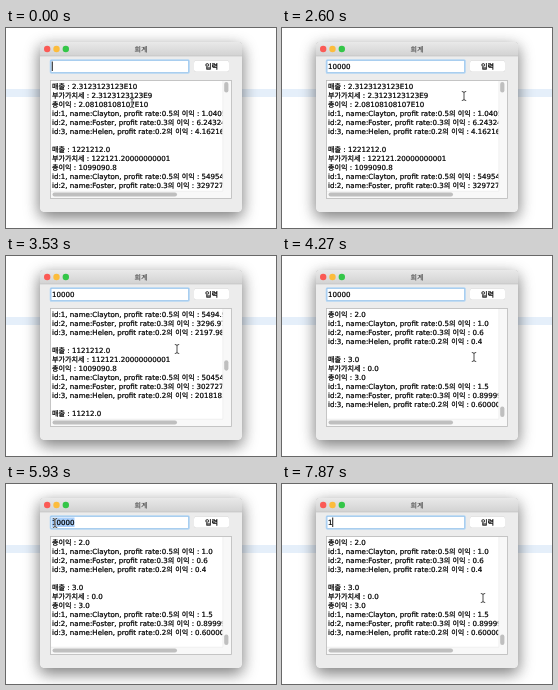
These frames come from a looping animation (270x200 px, 8 s). An HTML page:

```html
<!DOCTYPE html>
<html>
<head>
<meta charset="utf-8">
<style>
  html, body { margin: 0; width: 100%; height: 100%; overflow: hidden; background: #fff; }
  svg { display: block; }
  text {
    font: 7.08px "DejaVu Sans", "Noto Sans CJK KR", "Noto Sans CJK", sans-serif;
    fill: #000;
    stroke: #000;
    stroke-width: .22px;
    text-rendering: geometricPrecision;
  }
  .mid { text-anchor: middle; }
  .title { fill: #444; stroke: #444; stroke-width: .1px; }
  .window { filter: drop-shadow(0 5px 8px rgba(0, 0, 0, .42)) drop-shadow(0 0 .5px rgba(0, 0, 0, .4)); }
  .button { filter: drop-shadow(0 .4px .4px rgba(0, 0, 0, .3)); }
</style>
</head>
<body>
<svg width="270" height="200" viewBox="0 0 270 200">
  <defs>
    <linearGradient id="bar" x2="0" y2="1">
      <stop stop-color="#e9e9e9"/><stop offset="1" stop-color="#d2d2d2"/>
    </linearGradient>
    <clipPath id="view"><rect x="45" y="53" width="171.2" height="110"/></clipPath>
    <path id="beamShape" d="M-1.8-4.5Q0-4.5 0-3.4Q0-4.5 1.8-4.5M0-3.4V3.4M-1.8 4.5Q0 4.5 0 3.4Q0 4.5 1.8 4.5"/>
  </defs>
  <rect y="61" width="270" height="8" fill="#e5effa"/>

  <rect class="window" x="34" y="14" width="202" height="170" rx="3.5" fill="#ececec"/>
  <path d="M34 28V17.5a3.5 3.5 0 0 1 3.5-3.5h195a3.5 3.5 0 0 1 3.5 3.5V28z" fill="url(#bar)"/>
  <path d="M34 28h202" stroke="#bdbdbd" stroke-width=".6"/>
  <circle cx="41.2" cy="21" r="3.2" fill="#fb5a55"/>
  <circle cx="50.5" cy="21" r="3.2" fill="#fcbc3c"/>
  <circle cx="59.8" cy="21" r="3.2" fill="#34c648"/>
  <text class="mid title" x="135" y="23.5">회계</text>

  <rect x="44.5" y="32" width="138.5" height="13" rx="1" fill="#fff" stroke="#b4d6f4" stroke-width="1.6"/>
  <rect x="45" y="32.5" width="137.5" height="12" fill="none" stroke="#8dbdea" stroke-width=".5"/>
  <rect id="selection" y="33.5" height="9.5" fill="#a9cffb"/>
  <text id="field" x="46" y="41"></text>
  <rect id="caret" y="33.5" width=".9" height="9.5" fill="#000"/>

  <rect class="button" x="188" y="32.4" width="35" height="11.4" rx="2" fill="#fff"/>
  <text class="mid" x="205.5" y="40.8">입력</text>

  <rect x="44.5" y="52.5" width="181" height="118" fill="#fff" stroke="#b9b9b9" stroke-width=".8"/>
  <path d="M217 53h8v117h-180v-7h172z" fill="#f8f8f8"/>
  <path d="M216.8 53v110M45 163.2h172" stroke="#e4e4e4" stroke-width=".5"/>
  <rect x="46.5" y="164.5" width="124.5" height="4" rx="2" fill="#bfbfbf"/>
  <rect id="thumb" x="218.2" width="4.2" height="10.5" rx="2.1" fill="#bfbfbf"/>
  <g clip-path="url(#view)"><g id="log"></g></g>

  <g id="beam" fill="none" stroke-linecap="round">
    <use href="#beamShape" stroke="#fff" stroke-width="1.6" stroke-opacity=".7"/>
    <use href="#beamShape" stroke="#222" stroke-width=".8"/>
  </g>
  <path id="arrow" d="M0 0V7.6L1.8 6L3 8.9L4.3 8.3L3.1 5.5H5.5z" fill="#000" stroke="#fff" stroke-width=".6"/>
</svg>
<script>
// All times are in ticks of 1/15 s.
const FPS = 15, TICKS = 120, LINE = 9, LEFT = 46, CHAR = 4.5;
const $ = id => document.getElementById(id);

// Ledger: each sale gives revenue, tax, profit and the partners' shares.
const sales = [23123123123, 1221212, 112121, 1212, 12121, 112211, 1221, 12211,
               1121212, 11212, 1122, 112, 11, 1, 2, 3];
const partners = [['Clayton', 0.5], ['Foster', 0.3], ['Helen', 0.2]];

function decimal(n) {
  if (n >= 1e7) return n.toExponential().replace('e+', 'E');
  return Number.isInteger(n) ? n + '.0' : String(n);
}

function entry(sale) {
  const tax = sale < 10 ? 0 : sale * 0.1, profit = sale - tax;
  return [
    `매출 : ${decimal(sale)}`,
    `부가가치세 : ${decimal(tax)}`,
    `총이익 : ${decimal(profit)}`,
    ...partners.map(([name, rate], i) =>
      `id:${i + 1}, name:${name}, profit rate:${rate}의 이익 : ${decimal(profit * rate)}`),
    ''
  ];
}

const lines = sales.flatMap(entry);
const lastTop = lines.length - 12;
lines.forEach((line, i) => {
  const text = document.createElementNS('http://www.w3.org/2000/svg', 'text');
  text.setAttribute('x', LEFT);
  text.setAttribute('y', 60.5 + i * LINE);
  text.textContent = line;
  $('log').append(text);
});

const home = { x: 126, y: 75 };
const moves = [
  { from: 33, to: 39, x: 182, y: 68 },
  { from: 39, to: 41, x: 245, y: 64 },
  { from: 45, to: 51, x: 171, y: 93 },
  { from: 53, to: 61, x: 192, y: 101 },
  { from: 66, to: 70, x: 198, y: 126 },
  { from: 70, to: 79, x: 205, y: 42 },
  { from: 81, to: 88, x: 49, y: 39 },
  { from: 92, to: 99, x: 207, y: 132 },
  { from: 103, to: 108, x: 201, y: 114 }
];
const typeStart = 13, typeGap = 3.25, dragStart = 86, eraseAt = 93, retypeAt = 118;

function ease(tick, from, to) {
  const p = Math.min(1, Math.max(0, (tick - from) / (to - from)));
  return p * p * (3 - 2 * p);
}

function pointerAt(tick) {
  return moves.reduce((p, m) => {
    const k = ease(tick, m.from, m.to);
    return { x: p.x + (m.x - p.x) * k, y: p.y + (m.y - p.y) * k };
  }, home);
}

// Field content and the moment of the last key, which restarts the blinking.
function fieldAt(tick) {
  if (tick >= retypeAt) return { value: '1', edited: retypeAt };
  if (tick >= eraseAt) return { value: '', edited: eraseAt };
  const count = Math.min(5, Math.floor((tick - typeStart) / typeGap) + 1);
  if (count < 1) return { value: '', edited: -4 };
  return { value: '10000'.slice(0, count), edited: Math.floor(typeStart + typeGap * (count - 1)) };
}

const inside = (p, l, t, r, b) => p.x > l && p.x < r && p.y > t && p.y < b;
const show = (id, on) => $(id).setAttribute('visibility', on ? 'visible' : 'hidden');
const move = (id, x, y) => $(id).setAttribute('transform', `translate(${x} ${y})`);

function render(tick) {
  const pointer = pointerAt(tick);
  const overText = inside(pointer, 44, 32, 183, 45) || inside(pointer, 45, 53, 217, 163);
  show('beam', overText);
  show('arrow', !overText);
  move('beam', pointer.x, pointer.y);
  move('arrow', pointer.x, pointer.y);

  const top = Math.round(lastTop * ease(tick, 49, 56.8));
  move('log', 0, -top * LINE);
  $('thumb').setAttribute('y', 54 + 96.5 * top / lastTop);

  const { value, edited } = fieldAt(tick);
  const end = LEFT + value.length * CHAR;
  $('field').textContent = value;

  // Dragging leftwards selects whole characters.
  const start = LEFT + CHAR * Math.floor(Math.max(0, pointer.x - LEFT) / CHAR);
  const selecting = tick >= dragStart && tick < eraseAt && start < end;
  show('selection', selecting);
  $('selection').setAttribute('x', start);
  $('selection').setAttribute('width', Math.max(0, end - start));

  $('caret').setAttribute('x', end - 0.2);
  show('caret', !selecting && (tick - edited) % 15 < 8);
}

const began = performance.now();
function loop() {
  const elapsed = performance.now() - began;
  render(Math.floor(elapsed * FPS / 1000 + 0.05) % TICKS);
  requestAnimationFrame(loop);
}
loop();
</script>
</body>
</html>
```
